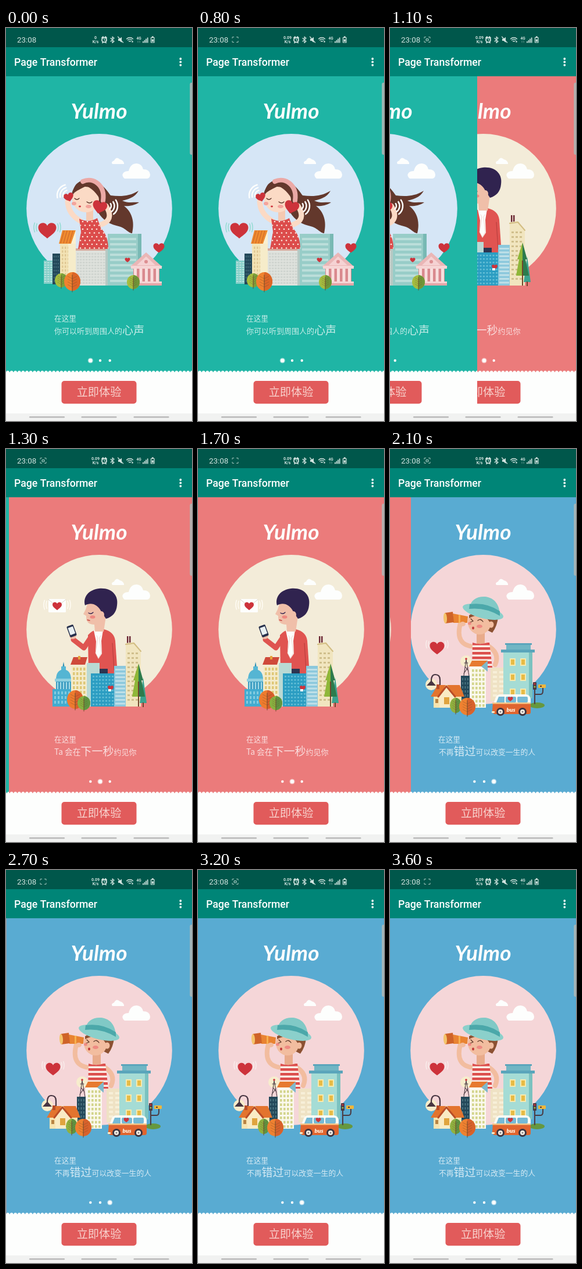
Animation of 320 by 676 pixels, one loop 3700 ms. Source, as an HTML page with a canvas:

```html
<!DOCTYPE html>
<html lang="zh">
<head>
<meta charset="utf-8">
<title>Page Transformer</title>
<style>
html, body { margin: 0; width: 100%; height: 100%; overflow: hidden; background: #fff; }
canvas { display: block; width: 320px; height: 676px; }
</style>
</head>
<body>
<canvas id="stage"></canvas>
<script>
const W = 320, H = 676, LOOP = 3700, STEP = 100;
const canvas = document.getElementById('stage');
const ctx = canvas.getContext('2d');
const dpr = window.devicePixelRatio || 1;
canvas.width = W * dpr;
canvas.height = H * dpr;

const CJK = '"Noto Sans CJK SC Light", "Noto Sans CJK SC", "Noto Sans CJK", sans-serif';
const UI = 'Roboto, sans-serif';
const WHITE = '#fdfefd', RED = '#cd333b', NAVY = '#23485a';

// ---- drawing helpers ----
function rect(x, y, w, h, fill, r = 0) {
  ctx.fillStyle = fill;
  ctx.beginPath();
  ctx.roundRect(x, y, w, h, r);
  ctx.fill();
}
function oval(x, y, rx, ry, fill, rot = 0) {
  ctx.fillStyle = fill;
  ctx.beginPath();
  ctx.ellipse(x, y, rx, ry, rot, 0, 7);
  ctx.fill();
}
const dot = (x, y, r, fill) => oval(x, y, r, r, fill);
function shape(d, fill) {
  ctx.fillStyle = fill;
  ctx.fill(new Path2D(d));
}
function line(d, color, w, cap = 'round') {
  ctx.strokeStyle = color;
  ctx.lineWidth = w;
  ctx.lineCap = cap;
  ctx.lineJoin = 'round';
  ctx.stroke(new Path2D(d));
}
function text(s, x, y, font, fill, align = 'left') {
  ctx.font = font;
  ctx.fillStyle = fill;
  ctx.textAlign = align;
  ctx.fillText(s, x, y);
}
function grid(x, y, cols, rows, dx, dy, w, h, fill) {
  for (let r = 0; r < rows; r++)
    for (let c = 0; c < cols; c++) rect(x + c * dx, y + r * dy, w, h, fill);
}
function clipped(d, draw) {
  ctx.save();
  ctx.clip(new Path2D(d));
  draw();
  ctx.restore();
}
function heart(x, y, w, rot = 0) {
  ctx.save();
  ctx.translate(x, y);
  ctx.rotate(rot);
  ctx.scale(w / 20, w / 20);
  shape('M0 9C-5 5 -10 2 -10 -3C-10 -9 -2 -10 0 -5C2 -10 10 -9 10 -3C10 2 5 5 0 9Z', RED);
  ctx.restore();
}
function waves(x, y, angle, n, r, gap, w, color = WHITE, spread = 0.75) {
  ctx.strokeStyle = color;
  ctx.lineWidth = w;
  ctx.lineCap = 'round';
  for (let i = 0; i < n; i++) {
    ctx.beginPath();
    ctx.arc(x, y, r + i * gap, angle - spread, angle + spread);
    ctx.stroke();
  }
}
function ringing(x, y, r, color) {
  waves(x, y, Math.PI, 2, r, 4, 1.4, color, 0.35);
  waves(x, y, 0, 2, r, 4, 1.4, color, 0.35);
}
function tree(x, y, rx, ry, light, dark) {
  oval(x, y, rx, ry, light);
  ctx.beginPath();
  ctx.ellipse(x, y, rx, ry, 0, -Math.PI / 2, Math.PI / 2);
  ctx.fillStyle = dark;
  ctx.fill();
  line(`M${x} ${y - ry * .7}V${y + ry + 2}`, '#6e4a2b', 1);
  for (let i = -1; i < 3; i++) {
    const b = y + i * ry * .3;
    line(`M${x - rx * .55} ${b - 4}L${x} ${b}L${x + rx * .55} ${b - 4}`, 'rgba(110,74,43,.55)', .7);
  }
}

// ---- illustrations ----
function girl() {
  const skin = '#fbdac5', hair = '#63382c';
  rect(65, 400, 16, 40, '#86cfc9');
  grid(66, 403, 3, 9, 5, 4, 3.5, 1.5, '#c6e7e2');
  rect(80, 388, 13, 53, NAVY);
  grid(82, 392, 3, 8, 3.5, 6, 1.5, 2.5, '#4a7480');
  rect(93, 369, 27, 72, '#f3e3b5');
  shape('M97 348H120L112 371H91Z', '#ef8b2f');
  shape('M120 348V371H112Z', '#fbf0d0');
  for (let i = 0; i < 4; i++) line(`M${100 + i * 5} 349L${94 + i * 5} 370`, '#c9622a', 1);
  grid(96, 376, 3, 9, 5, 6.5, 2.5, 4, '#e0c894');
  rect(107, 371, 13, 70, '#f6ecca');
  rect(120, 380, 54, 63, '#dfe2dd');
  grid(122, 387, 10, 11, 5, 5, 3.4, 3, '#d0d5d0');
  rect(120, 379, 51, 4, '#d7a99c');
  rect(171, 380, 4, 63, '#b7c9c4');
  rect(175, 354, 58, 89, '#98cdc8');
  rect(227, 354, 6, 89, '#78b9b4');
  grid(179, 361, 1, 9, 1, 9, 45, 4, '#bbdeda');
  // temple
  shape('M241 386L213 411H269Z', '#eab6b6');
  shape('M241 393L225 408H257Z', '#f5d2d3');
  dot(241, 402, 3, '#dd8f92');
  rect(215, 409, 53, 5, '#f6d5d5');
  rect(219, 414, 45, 23, '#d9898e');
  grid(220, 414, 5, 1, 9.5, 1, 5, 23, '#f8dfde');
  rect(215, 436, 53, 3, '#f6d5d5');
  rect(213, 439, 55, 4, '#e4a6a8');
  // head and arms
  shape('M116 290C112 268 130 258 146 262C164 264 174 280 180 288C196 290 212 290 228 280C222 292 208 295 200 297C210 302 220 299 229 300C220 306 208 307 203 306C216 316 222 332 217 353C210 353 206 343 190 340C174 336 162 326 156 312Z', hair);
  rect(138, 313, 12, 18, '#f5c9b1');
  line('M128 332Q107 320 106 298', skin, 9);
  line('M161 339Q188 331 172 306', skin, 9);
  oval(137, 295, 23, 22, skin, .2);
  shape('M113 287C115 270 130 260 148 263C142 273 126 275 113 287Z', hair);
  shape('M140 263C160 264 170 284 165 303C160 289 152 278 137 271Z', hair);
  line('M132 264C150 256 171 270 167 297', '#eba9a6', 8);
  line('M118 293Q122 297 126 293M139 299Q144 303 148 299', '#5d382c', 1.3);
  oval(117, 302, 4, 3, '#f4a39b');
  oval(142, 307, 5, 3, '#f4a39b');
  oval(127, 307, 2, 1.4, RED);
  const dress = 'M126 328Q142 336 157 327L163 344Q176 357 176 380H124L129 350Z';
  shape(dress, '#dc4c4b');
  clipped(dress, () => {
    for (let r = 0; r < 8; r++)
      for (let c = 0; c < 8; c++) dot(124 + c * 8 + r % 2 * 4, 333 + r * 6.5, 1.3, '#fbe9df');
  });
  heart(108, 291, 17, -.3);
  heart(161, 308, 25, .25);
  waves(107, 288, -2.6, 3, 9, 5, 2.4);
  waves(174, 306, .15, 3, 7, 5.5, 2.5);
  heart(71, 348, 31);
  ringing(71, 343, 19, '#8edbd0');
  heart(263, 378, 19);
  heart(209, 399, 9);
  tree(95, 434, 11, 12, '#a4bd3f', '#7ba03a');
  tree(114, 436, 14, 16, '#f0822f', '#dc6627');
  tree(219, 437, 11, 12, '#a4bd3f', '#6f9638');
}

function man() {
  const skin = '#f0bfa9', hair = '#30234f';
  // dome hall
  shape('M99 366L101 376H97Z', '#2f91b5');
  rect(95, 374, 8, 6, '#58b9d5');
  shape('M86 395Q87 380 99 379Q111 380 112 395Z', '#55b5d3');
  rect(84, 395, 29, 5, '#8fd0e0');
  rect(86, 400, 26, 13, '#3f9fc3');
  grid(88, 401, 5, 1, 5, 1, 2, 12, '#a5dae6');
  rect(80, 413, 32, 30, '#42acd0');
  grid(83, 417, 5, 3, 6, 8, 3, 5, '#83cbdf');
  // body
  line('M148 321L134 342L116 328', '#df5550', 9);
  shape('M141 320Q148 312 156 311L168 310Q186 314 188 330L192 388H142Z', '#e05451');
  line('M183 334L186 380', '#b9403f', 1.2);
  shape('M151 312L167 312L164 330L165 352L159 361L154 351L155 331Z', WHITE);
  line('M156 321L158 325L154 351L159 360L164 351L161 325L163 321', '#e9c3b8', .7);
  // head
  shape('M140 267L137 276L133 284L138 287Q137 302 152 302L153 314H168L172 288Q166 266 150 264Z', skin);
  shape('M136 269C132 255 142 242 160 240C182 238 194 252 191 269C190 281 183 289 172 292L164 280C158 267 146 263 136 269Z', hair);
  oval(164, 285, 5, 6, skin);
  line('M142 282Q146 285 150 281', hair, 1.3);
  oval(149, 289, 4.5, 2.8, '#ee8880');
  line('M140 294L144 295', '#c5443f', 1.3);
  // phone
  oval(115, 321, 6, 6, skin);
  ctx.save();
  ctx.translate(113, 313);
  ctx.rotate(-.35);
  rect(-6, -10, 12, 20, '#27304c', 2);
  rect(-4.5, -7, 9, 13, '#e9f0f2');
  ctx.restore();
  // envelope
  rect(73, 258, 30, 23, WHITE, 1.5);
  line('M73 259L88 271L103 259', '#dcd5c8', 1);
  heart(88, 270, 16);
  ringing(88, 268, 19, '#fffdf6');
  // town
  rect(112, 372, 27, 71, '#f4ebcb');
  shape('M116 358H140L136 371H111Z', '#cf4a3b');
  rect(124, 356, 4, 6, '#e6a23c');
  grid(115, 376, 4, 8, 6, 8, 3.5, 5, '#dfc878');
  rect(139, 368, 22, 75, '#b9d9d4');
  rect(161, 378, 14, 10, '#2c3551');
  rect(146, 386, 42, 57, '#2b9dc2');
  grid(149, 390, 7, 9, 5.5, 6, 3, 2.6, '#62bdd6');
  rect(186, 373, 21, 70, '#8cc8dc');
  grid(188, 378, 1, 10, 1, 6.5, 17, 3, '#bfe0e8');
  rect(208, 322, 2.5, 14, '#6c2935');
  rect(212, 322, 2.5, 14, '#6c2935');
  shape('M206 334L220 332L232 347V443H206Z', '#f1e5bf');
  line('M206 336L220 334L232 348', '#d2bd83', 2);
  grid(209, 350, 3, 11, 7, 8, 4, 3, '#d0bf8c');
  heart(180, 411, 10);
  rect(176, 413, 5, 4, WHITE);
  shape('M236 393L230 437H242Z', '#3ba28f');
  rect(235, 436, 2, 8, '#70452c');
  shape('M228 369L219 398H222L217 426H228Z', '#8fb739');
  shape('M228 369L236 398H233L239 426H228Z', '#2d7b4c');
  rect(227, 400, 2, 43, '#70452c');
  tree(119, 431, 14, 16, '#ee7b2e', '#d85f2b');
  tree(134, 437, 11, 12, '#88b13f', '#5f9640');
}

function boy() {
  const skin = '#f2bd9f', hair = '#8c5132';
  // back row
  rect(173, 376, 27, 58, '#efe2c4');
  grid(177, 382, 2, 6, 11, 8, 7, 4, '#f7efd8');
  rect(200, 335, 42, 11, '#70b6c4');
  rect(198, 334, 46, 3, '#5aa5bb');
  rect(195, 349, 50, 80, '#a5dcd5');
  rect(191, 345, 58, 5, '#5aa5bb');
  rect(239, 350, 6, 79, '#7bc2c0');
  grid(206, 360, 2, 3, 18, 26, 10, 13, '#f6e9ae');
  grid(208, 362, 2, 3, 18, 26, 6, 9, '#e8bb45');
  // figure
  line('M166 337Q190 350 181 371', skin, 8);
  line('M145 340Q111 338 121 300', skin, 8);
  rect(149, 315, 14, 20, '#e9ab8b');
  const shirt = 'M142 333Q157 338 171 332L176 376H141Z';
  shape(shirt, '#fbeee6');
  clipped(shirt, () => grid(138, 333, 1, 6, 1, 8, 42, 4.5, '#dc4e4c'));
  shape('M162 280L186 288Q185 304 176 316L164 310Z', hair);
  oval(154, 298, 20, 21, skin);
  shape('M136 286Q150 276 177 288L173 301Q168 290 160 287Q150 284 136 291Z', hair);
  oval(174, 302, 4.5, 5.5, skin);
  line('M151 295Q156 291 160 297M139 292L143 296L138 298', '#5b3828', 1.3);
  oval(154, 305, 5, 3, '#ee8a82');
  oval(137, 300, 3, 2.5, '#ee8a82');
  oval(143, 308, 2, 2.4, '#c43b3b');
  // hat
  oval(160, 280, 36, 11, '#8bd0cb', .25);
  shape('M137 274C138 260 149 253 164 254C180 256 189 268 189 287Q164 272 137 274Z', '#80c9c6');
  shape('M137 267Q166 263 189 279V287Q164 272 136 275Z', '#4ba8aa');
  shape('M108 283L134 288L133 299L109 299Z', '#e98331');
  rect(118, 285, 3, 14, '#f7b04e');
  shape('M94 282L108 280L110 298L95 300Z', '#cf6328');
  oval(95, 291, 3, 9, '#f4c46c', -.06);
  oval(125, 301, 5, 4, skin);
  // front row
  dot(131, 365, 10, '#f7edcd');
  line('M131 362L127 390M131 362L136 390M129 374L135 382M134 376L127 386M128 368H134', '#4a3a42', 1.1);
  dot(131, 361, 1.8, RED);
  rect(122, 390, 16, 46, NAVY);
  grid(124, 394, 3, 6, 4.5, 7, 2, 4, '#4a7480');
  rect(137, 373, 28, 72, '#fbf9ee');
  shape('M141 364H168L163 374H136Z', '#e77a30');
  shape('M168 364V383L157 374Z', '#7fb9cc');
  grid(141, 379, 4, 9, 6, 7.5, 3.6, 4.5, '#d3d48c');
  // lamp
  dot(71, 405, 10, '#f8ecca');
  line('M86 440V397Q86 388 78 388Q71 388 71 399', '#473541', 2.2);
  shape('M71 398L79 407H63Z', '#473541');
  // house
  rect(75, 424, 48, 21, '#f7e4b0');
  shape('M82 406H120L128 426H70Z', '#e3742e');
  shape('M97 404L85 425V445H110V425Z', '#f9ebc4');
  line('M83 426L97 408L112 426', '#b94d27', 3);
  rect(93, 427, 9, 12, '#e0a43e');
  rect(78, 430, 5, 7, '#b98443');
  rect(80, 405, 5, 8, '#b94d27');
  tree(113, 441, 10, 13, '#8fb13f', '#5f9440');
  tree(133, 443, 14, 15, '#ef8130', '#d8622b');
  // street sign
  oval(253, 441, 13, 5, '#66983f');
  line('M249 438V402M249 422H259Q263 422 263 416V408', '#4b3a42', 2);
  rect(246, 401, 6, 13, '#4b3a42', 1);
  dot(249, 404, 1.5, RED);
  dot(249, 409, 1.5, '#9ec34a');
  rect(255, 405, 13, 6, '#eeb63c', 1);
  rect(258, 407, 3, 2, '#4b3a42');
  // van
  shape('M178 438L182 427Q184 422 191 422H234Q241 423 242 430V438Z', '#fbfaf4');
  shape('M177 436H242V453Q242 456 238 456H180Q176 455 176 450Z', '#e0652f');
  rect(176, 436, 66, 2.5, '#f5c98c');
  shape('M183 436L187 426H197V436Z', '#75bad6');
  rect(199, 426, 18, 10, '#75bad6', 2);
  rect(219, 426, 18, 10, '#75bad6', 2);
  heart(207, 430, 9);
  text('bus', 208, 452, 'italic 900 10px Lato, sans-serif', '#fff6e6', 'center');
  for (const x of [190, 228]) {
    dot(x, 452, 7, '#3d3440');
    dot(x, 452, 4, '#f3eee4');
    dot(x, 452, 1.5, '#8b8287');
  }
  rect(175, 451, 5, 3, '#f7e9c5');
  heart(81, 342, 25);
  ringing(81, 336, 15, '#f9eeec');
}

const pages = [
  { bg: '#1fb5a5', disc: '#d6e6f6', art: girl, words: [['你可以听到周围人的', 13], ['心声', 19]], x: 83 },
  { bg: '#eb7b7b', disc: '#f3ecd9', art: man, words: [['Ta 会在', 13.8], ['下一秒', 19], ['约见你', 13]], x: 83 },
  { bg: '#59abd2', disc: '#f5d6d8', art: boy, words: [['不再', 12.8], ['错过', 19], ['可以改变一生的人', 12.8]], x: 84 }
];

function drawPage(index, x) {
  const page = pages[index];
  ctx.save();
  ctx.translate(x, 0);
  ctx.beginPath();
  ctx.rect(0, 83, W, 580);
  ctx.clip();
  rect(0, 83, W, 580, page.bg);
  rect(0, 592, W, 71, WHITE);
  for (let i = 0; i < 50; i++) dot(3 + i * 6.6, 592.5, 2.9, WHITE);
  text('Yulmo', 160, 156, 'italic 700 37px Lato, sans-serif', WHITE, 'center');
  oval(160.5, 310.5, 125.3, 128.5, page.disc);
  shape('M183 234Q180 230 186 228Q190 220 196 226Q201 227 203 232V234Z', WHITE);
  shape('M204 259Q198 254 202 249Q205 246 211 246Q214 233 225 233Q234 234 236 243Q247 243 248 252Q248 258 243 259Z', WHITE);
  page.art();
  const ink = 'rgba(255,255,255,.75)';
  text('在这里', 83, 504, `300 12.7px ${CJK}`, ink);
  let left = page.x;
  for (const [s, size] of page.words) {
    text(s, left, size > 15 ? 527 : 525.5, `300 ${size}px ${CJK}`, ink);
    left += ctx.measureText(s).width;
  }
  for (let i = 0; i < 3; i++) {
    const cx = 145.3 + i * 16.7;
    if (i === index) dot(cx, 572, 4.6, 'rgba(255,255,255,.5)');
    dot(cx, 572, i === index ? 3.2 : 2.2, WHITE);
  }
  rect(95.5, 607, 129, 39.3, '#e15b5b', 5);
  text('立即体验', 160, 632.6, `300 19.2px ${CJK}`, '#f8d3ce', 'center');
  ctx.restore();
}

// ---- phone chrome ----
function statusBar(t) {
  rect(0, 0, W, 33, '#00574b');
  const ink = '#d3e4e0';
  text('23:08', 19, 25, `13.4px ${UI}`, ink);
  if (t >= 300) {
    line('M59 18V15.5H62M66 15.5H69V18M69 22V24.5H66M62 24.5H59V22', '#9fc4bb', 1, 'butt');
    if (t % 1000 < 500) {
      rect(61.5, 18, 5, 4.5, '#9fc4bb', 1);
      dot(64, 20.2, 1.2, '#00574b');
    }
  }
  text(t < 800 ? '0' : '0.09', 154, 18.5, `700 7px ${UI}`, ink, 'center');
  text('K/s', 154, 26, `700 7px ${UI}`, ink, 'center');
  // alarm
  line('M165 17L167 15M173 17L171 15M166 25.5L167 24M172 25.5L171 24', ink, 1.8);
  ctx.beginPath();
  ctx.arc(169, 20.5, 4, 0, 7);
  ctx.stroke();
  line('M169 18.5V21H171', ink, 1);
  // bluetooth
  line('M180 17.5L186 23L183 25.5V15L186 17.5L180 23', ink, 1.2);
  // muted speaker
  shape('M193 18.5H195.5L199 15.5V25L195.5 22H193Z', ink);
  line('M192.5 15L201.5 25', ink, 1.2);
  // signal
  waves(213, 24.5, -Math.PI / 2, 3, 2, 3, 1.4, ink);
  dot(217.5, 23.5, 1.3, ink);
  text('4G', 228.5, 19.5, `700 6.5px ${UI}`, ink, 'center');
  line('M227 22V25M230 22V25', '#5f938a', 1);
  for (let i = 0; i < 4; i++) rect(235 + i * 2.6, 23 - i * 2.2, 1.7, 2.5 + i * 2.2, ink);
  // battery
  line('M249.5 16.5H255V25H249.5Z', ink, 1.2);
  rect(250.8, 14.3, 3, 2, ink);
  rect(250.8, 19.5, 3, 4, ink);
}

function chrome(t) {
  statusBar(t);
  rect(0, 33, W, 50, '#008577');
  text('Page Transformer', 14, 65, `500 17.7px ${UI}`, '#fff');
  for (let i = 0; i < 3; i++) dot(300.3, 53 + i * 5.4, 1.9, '#fff');
  rect(0, 663, W, 13, '#f1f2f1');
  for (const x of [40, 129.5, 219.5]) rect(x, 668, 61, 2.6, '#b9b9b9', 1.3);
  rect(316.3, 94, 8, 124, 'rgba(176,184,183,.88)', 3);
}

// Finger drag for 100 ms, then a quintic settle over 400 ms.
function swipe(t) {
  if (t < 0) return 0;
  if (t < 100) return .1 + .0043 * t;
  const u = Math.min(1, (t - 100) / 400);
  return 1 - .47 * (1 - u) ** 5;
}

function render(t) {
  ctx.setTransform(dpr, 0, 0, dpr, 0, 0);
  rect(0, 0, W, H, '#fff');
  const pos = swipe(t - 1000) + swipe(t - 1900);
  const top = Math.floor(pos), shift = pos - top;
  // The next page waits underneath while the current one slides off.
  if (shift > 0) drawPage(top + 1, 0);
  drawPage(top, -Math.round(shift * W));
  if (t >= 2300 && t < 3000) rect(0, 83, 1, 508, '#9a9fae');
  chrome(t);
}

const start = performance.now();
let shown = -1;
function tick() {
  const t = (performance.now() - start) % LOOP;
  const step = Math.floor(t / STEP) * STEP;
  if (step !== shown) render(shown = step);
  requestAnimationFrame(tick);
}
tick();
</script>
</body>
</html>
```
